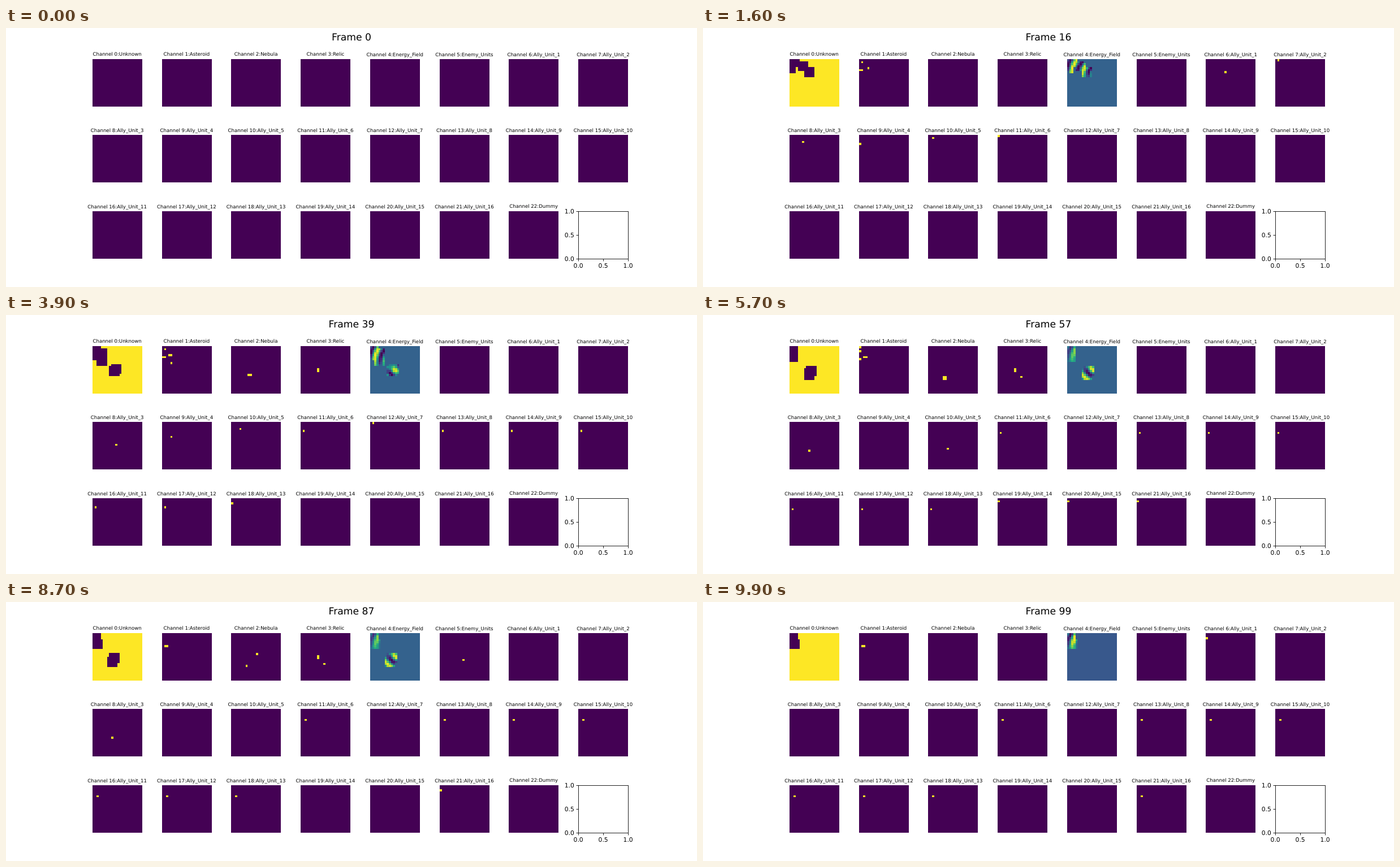
Recreate the animation shown at these times as an HTML page with a canvas. Size 1222 px wide and 458 px high, loop 10 s.

```html
<!DOCTYPE html>
<html lang="en">
<head>
<meta charset="utf-8">
<title>Observation channels</title>
<style>
  html, body { margin: 0; width: 100%; height: 100%; overflow: hidden; background: #fff; }
  canvas { display: block; }
</style>
</head>
<body>
<canvas id="stage" width="1222" height="458"></canvas>
<script>
const ctx = document.getElementById('stage').getContext('2d');
const W = 1222, H = 458, N = 24, FRAMES = 100, STEP_MS = 100;
const FONT = '"DejaVu Sans", sans-serif';

// Panel grid: pixel-aligned images, titles centred on the exact slots
const PW = 88, PH = 84, SLOT_W = 87.69;
const slotX = i => 152.75 + (i % 8) * 122.77;
const slotY = i => 54.96 + Math.floor(i / 8) * 134.35;

const FIRST_ALLY = 6, LAST_ALLY = 21;
const NAMES = ['Unknown', 'Asteroid', 'Nebula', 'Relic', 'Energy_Field', 'Enemy_Units'];
for (let n = 1; n <= 16; n++) NAMES.push('Ally_Unit_' + n);
NAMES.push('Dummy');

const STOPS = ['440154', '472d7b', '3b528b', '2c728e', '21918c', '28ae80', '5ec962', 'addc30', 'fde725']
  .map(h => [0, 2, 4].map(i => parseInt(h.slice(i, i + 2), 16)));

function viridis(v) {
  const p = Math.min(Math.max(v, 0), 1) * (STOPS.length - 1);
  const i = Math.min(Math.floor(p), STOPS.length - 2);
  const mix = STOPS[i].map((a, k) => Math.round(a + (STOPS[i + 1][k] - a) * (p - i)));
  return `rgb(${mix})`;
}
const LOW = viridis(0), HIGH = viridis(1);

// Walks one cell per frame to each goal in turn; a goal is {x, y, from: departure frame}
function walk(f, start, goals) {
  let pos = start;
  for (const { x, y, from } of goals) {
    if (f < from) break;
    const dx = x - pos[0], dy = y - pos[1];
    const s = Math.min(1, (f - from) / (Math.abs(dx) + Math.abs(dy)));
    pos = [Math.round(pos[0] + dx * s), Math.round(pos[1] + dy * s)];
  }
  return pos;
}

// One ally appears every third frame. After `hide` it still sees but is not shown; at `end` it is gone.
const bornAt = ch => 1 + 3 * (ch - FIRST_ALLY);
const goal = (x, y, from) => ({ x, y, from });
const unit = (ch, move, hide = FRAMES, end = FRAMES, born = bornAt(ch)) => ({ ch, move, hide, end, born });

function scout(ch, first, later, hide, end) {
  const goals = [goal(...first, bornAt(ch)), ...later];
  return unit(ch, f => walk(f, [0, 0], goals), hide, end);
}

// Guards go down, then right, to a post that shifts with the drifting asteroids
function guard(ch) {
  return unit(ch, f => {
    const s = f - bornAt(ch), y = Math.min(s, f < 40 ? 4 : 5);
    return [Math.min(s - y, f < 80 ? 1 : 2), y];
  });
}

const UNITS = [
  scout(6, [9, 6], [goal(10, 12, 16)], 30, 97),
  scout(7, [1, 0], [], 30),
  scout(8, [6, 3], [goal(11, 11, 16), goal(9, 14, 45)], 97, 97),
  scout(9, [0, 4], [goal(4, 7, 22)], 50, 50),
  scout(10, [2, 1], [goal(4, 3, 16), goal(9, 13, 40), goal(11, 14, 60)], 74, 85),
  scout(12, [1, 0], [], 50),
  scout(19, [0, 1], [], 86, 86),
  scout(20, [0, 1], [], 86, 86),
  scout(21, [0, 1], [goal(2, 5, 86)]),
  unit(6, f => [0, f - 97], FRAMES, FRAMES, 97),
  ...[11, 13, 14, 15, 16, 17, 18].map(guard)
];
const enemyAt = f => walk(f, [12, 12], [goal(13, 13, 66), goal(11, 13, 80)]);

const ASTEROIDS = [[1, -1], [1, 1], [3, 4], [4, 4], [0, 5], [1, 5], [4, 8]];
const NEBULAE = [[8, 14], [9, 14], [8, 15], [9, 15], [14, 8]];
const RELICS = [[8, 11], [8, 12]];
const mirror = ([x, y]) => [N - 1 - y, N - 1 - x];

// Mirrored pair of wave sources that drifts once
function energy(x, y, f) {
  const node = [f < 50 ? 13 : 14, 6];
  const wave = ([nx, ny]) => 4 * Math.sin(1.2 * Math.hypot(x - nx, y - ny) + 1);
  return Math.round(wave(node) + wave(mirror(node)) + 2.7);
}

function fillCells(ch, x, y, w, h, color) {
  const edgeX = c => Math.round(slotX(ch)) + Math.round(c * PW / N);
  const edgeY = r => Math.round(slotY(ch)) + Math.round(r * PH / N);
  ctx.fillStyle = color;
  ctx.fillRect(edgeX(x), edgeY(y), edgeX(x + w) - edgeX(x), edgeY(y + h) - edgeY(y));
}
const cell = (ch, x, y, color = HIGH) => fillCells(ch, x, y, 1, 1, color);
const fillPanel = (ch, color) => fillCells(ch, 0, 0, N, N, color);

function label(str, x, y, size, align = 'center') {
  ctx.font = `${size}px ${FONT}`;
  ctx.textAlign = align;
  ctx.fillStyle = '#000';
  ctx.fillText(str, x, y);
}

function drawAxes() {
  const l = 1012.5, t = 324.5, r = l + PW, b = t + PH;
  ctx.strokeStyle = '#000';
  ctx.lineWidth = 0.86;
  ctx.strokeRect(l, t, PW, PH);
  ctx.beginPath();
  for (const v of [0, 0.5, 1]) {
    const x = l + PW * v, y = b - PH * v;
    ctx.moveTo(x, b);
    ctx.lineTo(x, b + 4);
    ctx.moveTo(l, y);
    ctx.lineTo(l - 4, y);
    label(v.toFixed(1), x - 0.4, 424, 10.8);
    label(v.toFixed(1), 1004.8, Math.floor(y) + 4, 10.8, 'right');
  }
  ctx.stroke();
}

function drawMaps(f) {
  const seen = new Set();
  const id = (x, y) => y * N + x;
  const active = UNITS.filter(u => f >= u.born && f < u.end).map(u => ({ u, pos: u.move(f) }));
  for (const { pos: [ux, uy] } of active) {
    for (let y = Math.max(0, uy - 2); y <= uy + 2; y++)
      for (let x = Math.max(0, ux - 2); x <= ux + 2; x++) seen.add(id(x, y));
  }
  if (!seen.size) return;

  const cells = [...seen].map(k => [k % N, Math.floor(k / N)]);
  const levels = cells.map(([x, y]) => energy(x, y, f));
  const min = Math.min(0, ...levels), max = Math.max(0, ...levels);
  const shade = e => viridis((e - min) / (max - min));
  fillPanel(0, HIGH);
  fillPanel(4, shade(0));
  cells.forEach(([x, y], i) => {
    cell(0, x, y, LOW);
    cell(4, x, y, shade(levels[i]));
  });

  const showSeen = (ch, x, y) => {
    if (x >= 0 && y >= 0 && seen.has(id(x, y))) cell(ch, x, y);
  };
  const drift = Math.floor(f / 40);
  ASTEROIDS.forEach(([x, y]) => showSeen(1, x - drift, y + drift));
  NEBULAE.forEach(([x, y]) => showSeen(2, x - drift, y + drift));
  [...RELICS, ...RELICS.map(mirror)].forEach(p => showSeen(3, ...p));
  if (f >= 62) showSeen(5, ...enemyAt(f));

  for (const { u, pos } of active) if (f < u.hide) cell(u.ch, ...pos);
}

function draw(f) {
  ctx.fillStyle = '#fff';
  ctx.fillRect(0, 0, W, H);
  label('Frame ' + f, W / 2, 22, 17.2);
  NAMES.forEach((name, ch) => {
    fillPanel(ch, LOW);
    // The underscore's deeper descent sets the title one pixel lower
    const baseline = Math.round(slotY(ch) - 6) + (name.includes('_') ? 1 : 0);
    label(`Channel ${ch}:${name}`, slotX(ch) + SLOT_W / 2, baseline, 8.6);
  });
  drawMaps(f);
  drawAxes();
}

ctx.textRendering = 'geometricPrecision';
const start = performance.now();
let shown = -1;
function tick() {
  const f = Math.floor((performance.now() - start) / STEP_MS) % FRAMES;
  if (f !== shown) draw(shown = f);
  requestAnimationFrame(tick);
}
tick();
</script>
</body>
</html>
```
